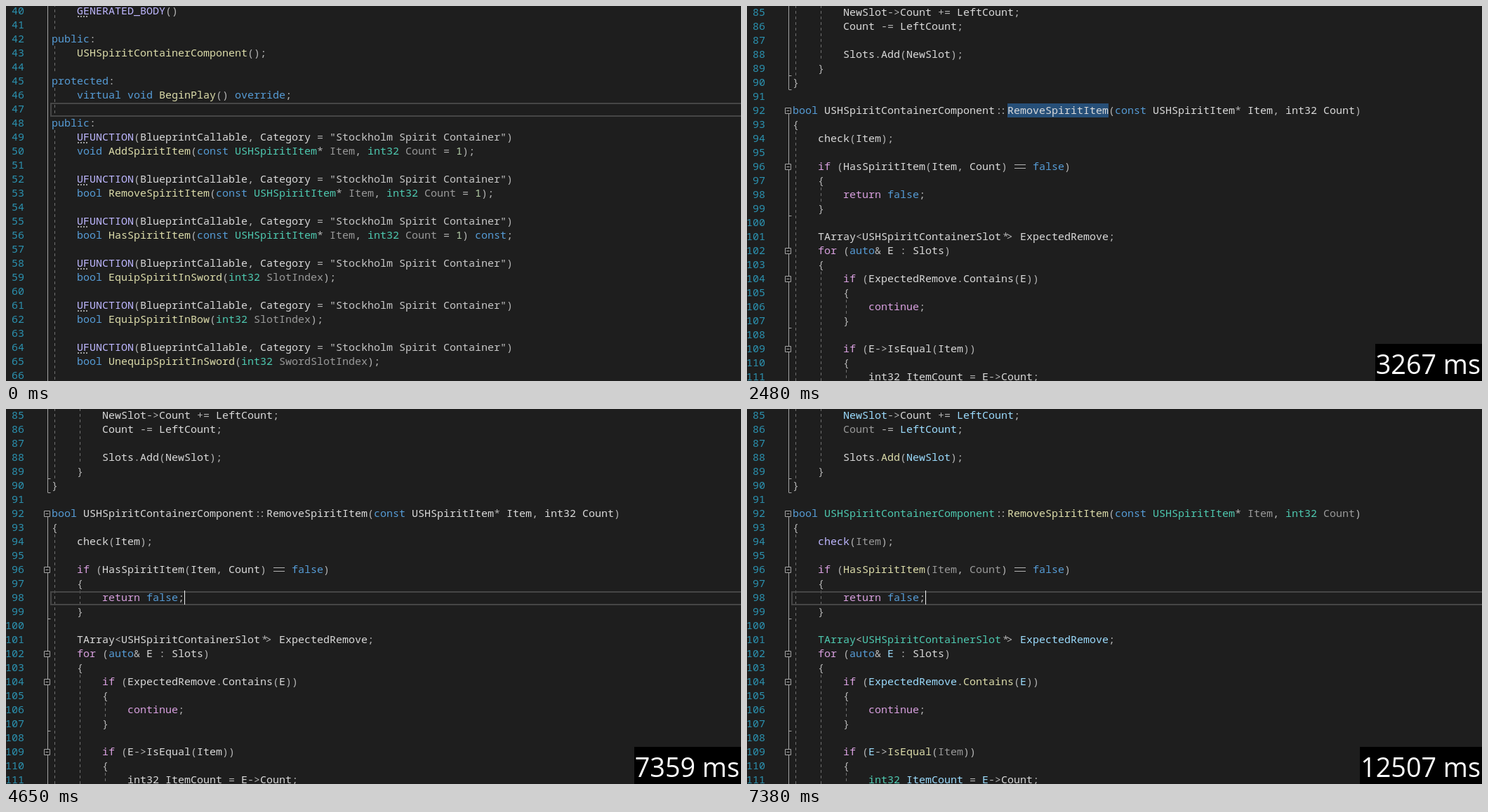
These frames come from a looping animation (1047x535 px, 8000 ms). An HTML page:

```html
<!DOCTYPE html>
<html lang="en">
<head>
<meta charset="utf-8">
<title>Go to definition timing</title>
<style>
  html, body { margin: 0; width: 100%; height: 100%; overflow: hidden; background: #1e1e1e; }
  svg { display: block; }
  text { font: 15px "Noto Sans Mono", "DejaVu Sans Mono", monospace; white-space: pre; }
  .num { fill: #2b91af; text-anchor: end; }
  .ident { fill: #dadada; }
  .punct { fill: #b4b4b4; stroke: none; }
  .string { fill: #c8c8c8; }
  .digit { fill: #b5cea8; }
  .keyword { fill: #569cd6; }
  .control { fill: #d8a0df; }
  .type { fill: #4ec9b0; }
  .func { fill: #dcdcaa; }
  .local { fill: #9cdcfe; }
  .param { fill: #9a9a9a; }
  .macro { fill: #beb7ff; }
  .plain :is(.type, .func, .local, .param, .macro) { fill: #dadada; }
  .solid { fill: none; stroke: #a5a5a5; }
  .fold { fill: #1e1e1e; stroke: #a5a5a5; }
  .dash { fill: none; stroke: #707070; stroke-dasharray: 4 4; }
  .hint { stroke: #a0a0a0; stroke-width: 2; stroke-dasharray: 2 2; }
  .equal { stroke: #b4b4b4; stroke-width: 1.2; }
  .line { fill: none; stroke: #464646; stroke-width: 2; }
  .select { fill: #264f78; }
  .caret { fill: #f0f0f0; }
  #timer text { font: 37.75px "Open Sans", "Noto Sans", sans-serif; fill: #fff; text-anchor: end; }
</style>
</head>
<body>
<svg id="stage" width="1047" height="535" viewBox="0 0 1047 535">
  <g id="header"></g>
  <g id="source"></g>
  <g id="timer"><rect y="482" height="53"/><text x="1045" y="524.5"></text></g>
</svg>
<script>
const LOOP = 8000, STEP = 70, OPEN = 800, DONE = 7380;
const LEFT = 65, CHAR = 9, ROW = 20;

const ufunction = '    UFUNCTION(BlueprintCallable, Category = "Stockholm Spirit Container")';
const headerCode = `    GENERATED_BODY()

public:
    USHSpiritContainerComponent();

protected:
    virtual void BeginPlay() override;

public:
${ufunction}
    void AddSpiritItem(const USHSpiritItem* Item, int32 Count = 1);

${ufunction}
    bool RemoveSpiritItem(const USHSpiritItem* Item, int32 Count = 1);

${ufunction}
    bool HasSpiritItem(const USHSpiritItem* Item, int32 Count = 1) const;

${ufunction}
    bool EquipSpiritInSword(int32 SlotIndex);

${ufunction}
    bool EquipSpiritInBow(int32 SlotIndex);

${ufunction}
    bool UnequipSpiritInSword(int32 SwordSlotIndex);
`;
const sourceCode = `    while (Count > 0)
    {
        USHSpiritContainerSlot* NewSlot = NewObject<USHSpiritContainerSlot>();
        NewSlot->Item = Item;

        int32 LeftCount = FMath::Min(NewSlot->GetLeftFromMax(), Count);
        NewSlot->Count += LeftCount;
        Count -= LeftCount;

        Slots.Add(NewSlot);
    }
}

bool USHSpiritContainerComponent::RemoveSpiritItem(const USHSpiritItem* Item, int32 Count)
{
    check(Item);

    if (HasSpiritItem(Item, Count) == false)
    {
        return false;
    }

    TArray<USHSpiritContainerSlot*> ExpectedRemove;
    for (auto& E : Slots)
    {
        if (ExpectedRemove.Contains(E))
        {
            continue;
        }

        if (E->IsEqual(Item))
        {
            int32 ItemCount = E->Count;`;

const wordKinds = [
  ['keyword', /^(public|protected|virtual|void|override|const|bool|false|auto)$/],
  ['control', /^(while|if|for|return|continue)$/],
  ['macro', /^(UFUNCTION|GENERATED_BODY|check)$/],
  ['digit', /^\d/],
];
const nameKinds = [
  ['type', /^(USH\w+|TArray|int32|FMath)$/],
  ['local', /^(NewSlot|LeftCount|E|ItemCount|ExpectedRemove)$/],
  ['param', /^(Item|Count|SlotIndex|SwordSlotIndex)$/],
];
const find = (kinds, word) => kinds.find(([, test]) => test.test(word))?.[0];

function kindOf(word, before, after) {
  if (word[0] === '"') return 'string';
  if (!/^\w/.test(word)) return 'punct';
  const fixed = find(wordKinds, word);
  if (fixed) return fixed;
  if (after[0] === '(' || word === 'NewObject') return 'func';
  if (/(->|\.)$/.test(before)) return 'ident';
  return find(nameKinds, word) || 'ident';
}

function add(parent, tag, attrs, text) {
  const node = document.createElementNS('http://www.w3.org/2000/svg', tag);
  for (const key in attrs) node.setAttribute(key, attrs[key]);
  if (text !== undefined) node.textContent = text;
  parent.append(node);
  return node;
}

// Joined operators: inward shift of each of the two characters.
const joined = { '::': [1.5, -1.5], '*>': [2, -1.5] };

function drawToken(parent, word, kind, x, mid) {
  const put = (s, dx) => add(parent, 'text', { class: kind, x: x + dx, y: mid + 5 }, s);
  if (word === '==') {
    add(parent, 'path', { class: 'equal', d: `M${x + 1} ${mid - 2.5}h16m-16 5h16` });
  } else if (joined[word]) {
    joined[word].forEach((shift, i) => put(word[i], i * CHAR + shift));
  } else {
    put(word, 0);
  }
}

function drawCode(parent, code, first, top) {
  code.split('\n').forEach((line, i) => {
    const mid = top + i * ROW;
    add(parent, 'text', { class: 'num', x: 26, y: mid + 5 }, first + i);
    for (const m of line.matchAll(/"[^"]*"|\w+|::|==|\*>|[^\s\w]/g)) {
      const word = m[0], end = m.index + word.length;
      const kind = kindOf(word, line.slice(0, m.index), line.slice(end));
      const x = LEFT + m.index * CHAR;
      drawToken(parent, word, kind, x, mid);
      if (kind === 'macro' && parent.id === 'header')
        add(parent, 'path', { class: 'hint', d: `M${x + 1} ${mid + 8}h15` });
    }
  });
}

const $ = id => document.getElementById(id);
const header = $('header'), source = $('source'), timer = $('timer');
const [timerBox, timerText] = timer.children;
const headTop = n => (n - 40) * ROW - 3;
const srcTop = n => (n - 79) * ROW - 1;

const lineBox = (parent, y) => add(parent, 'rect', { class: 'line', x: 64, y: y + 2, width: 1000, height: 18 });
const selection = (parent, x, y) => add(parent, 'rect', { class: 'select', x, y, width: 16 * CHAR, height: ROW });
const caret = (parent, x, y) => add(parent, 'rect', { class: 'caret', x, y, width: 1, height: ROW });
// Dashed indent guide through rows a to b.
const guide = (parent, top, x, a, b) =>
  add(parent, 'path', { class: 'dash', d: `M${x + .5} ${top(a)}V${top(b + 1)}` });

// Header view
for (const [a, b] of [[40, 41], [43, 44], [46, 47], [49, 66]]) guide(header, headTop, 69, a, b);
add(header, 'path', { class: 'solid', d: 'M59.5 0V535' });
const headLine = lineBox(header, headTop(47));
const headClick = lineBox(header, headTop(53));
const headPick = selection(header, 146, headTop(53));
drawCode(header, headerCode, 40, 7);
const headCaret = caret(header, 290, headTop(53));

// Source view
const outline = add(source, 'g', {});
for (const [x, a, b] of [[69, 79, 89], [69, 94, 111], [105, 81, 88], [105, 98, 98],
  [105, 104, 111], [141, 106, 106], [141, 111, 111]]) guide(outline, srcTop, x, a, b);
const tick = n => `M59.5 ${srcTop(n) + .5}h4`;
add(outline, 'path', {
  class: 'solid',
  d: `M59.5 -1V${srcTop(91)}M59.5 ${srcTop(92) + 10}V700` + [90, 91, 100, 108].map(tick).join(''),
});
for (const n of [79, 92, 96, 102, 104, 109])
  add(outline, 'path', { class: 'fold', d: `M54.5 ${srcTop(n) + 6.5}h8v8h-8zm2 4h4` });
const srcLine = lineBox(source, srcTop(98));
const srcPick = selection(source, 371, srcTop(92));
drawCode(source, sourceCode, 79, 9);
const pickCaret = caret(source, 515, srcTop(92));
const clickCaret = caret(source, 254, srcTop(98));

const show = (node, on) => { node.style.display = on ? '' : 'none'; };
const blink = (ms, start) => ms < start || (ms - start) % 1060 < 530;

function render(t) {
  const opened = t >= OPEN;
  show(header, !opened);
  show(source, opened);
  show(timer, opened);
  if (!opened) {
    show(headLine, t < 460);
    show(headClick, t >= 460 && t < 530);
    show(headPick, t >= 530);
    show(headCaret, t >= 460);
    return;
  }
  const ms = 99 + 132 * Math.floor((Math.min(t, DONE) - OPEN) / STEP);
  const clickMs = 6039, clicked = ms >= clickMs;
  const scroll = t < 1150 ? 0 : t < 1220 ? 60 : 120;
  source.setAttribute('transform', `translate(0 ${-scroll})`);
  source.setAttribute('class', t < DONE ? 'plain' : '');
  show(outline, t >= 940);
  show(srcLine, clicked);
  show(srcPick, !clicked);
  show(pickCaret, !clicked && blink(ms, 350));
  show(clickCaret, clicked && blink(ms, clickMs));

  const width = 66 + 21.6 * String(ms).length;
  timerBox.setAttribute('x', Math.round(1047 - width));
  timerBox.setAttribute('width', Math.round(width) + 1);
  timerText.textContent = ms + ' ms';
}

function frame() {
  render(performance.now() % LOOP);
  requestAnimationFrame(frame);
}
frame();
</script>
</body>
</html>
```
